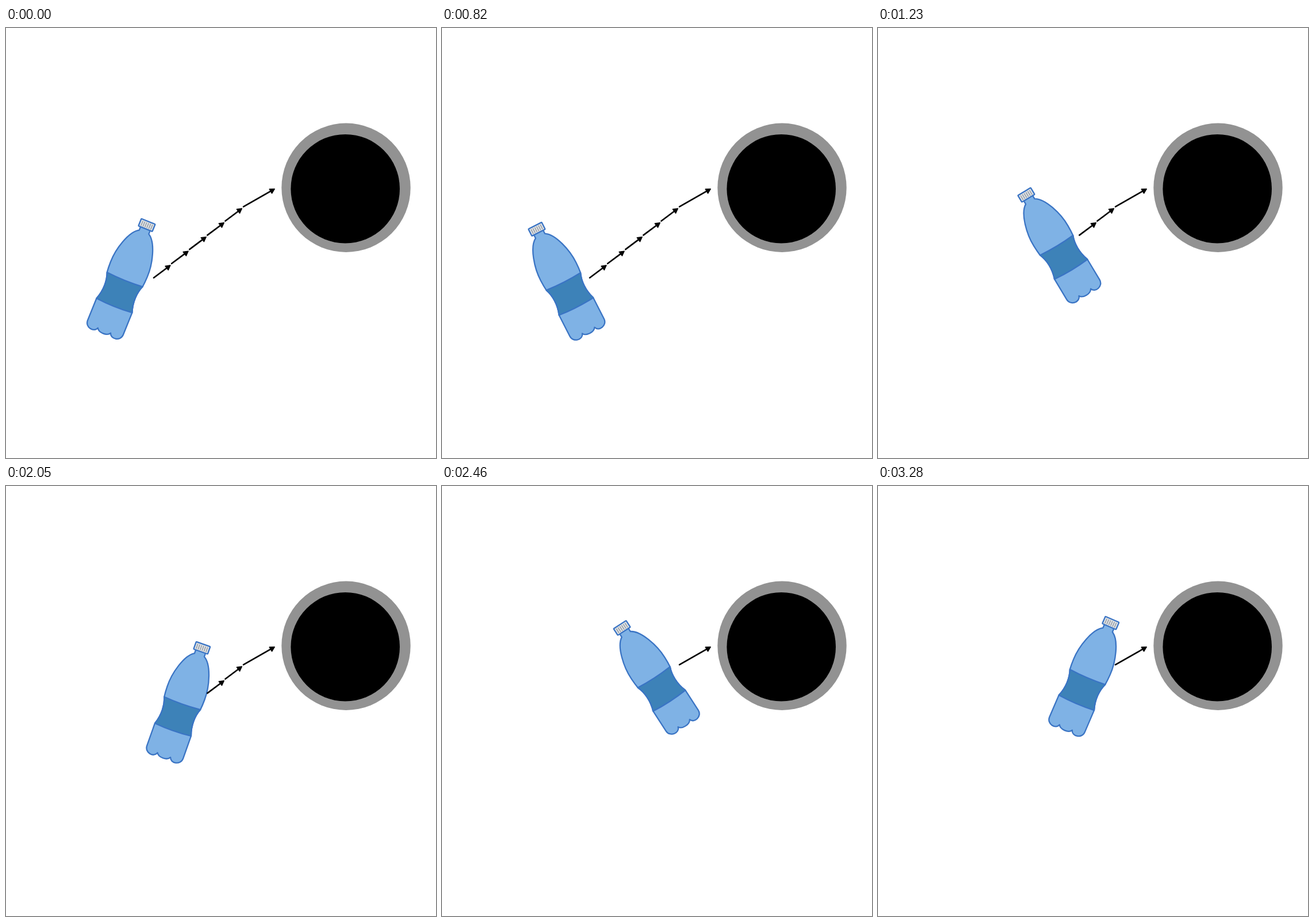
An HTML page for the animation above (3.69 s loop, 748 px wide and 748 px high).

```html
<!DOCTYPE html>
<html lang="en">
<head>
<meta charset="utf-8">
<title>Bottle rocking toward a hole</title>
<style>
  html, body { margin: 0; width: 100%; height: 100%; overflow: hidden; background: #fff; }
  svg { display: block; width: 100%; height: 100%; }
  #bottle { stroke: #3a74c4; stroke-width: 2.3; stroke-linejoin: round; stroke-linecap: round; }
</style>
</head>
<body>
<svg viewBox="0 0 748 748">
  <circle cx="591.5" cy="277.8" r="112.2" fill="#929292"/>
  <circle cx="590.2" cy="279.7" r="94.8"/>
  <g id="bottle">
    <path fill="#7fb2e5" d="M-10-95V-88C-26-79-36-42-35.5-18C-35.4-10-35-4-34.4 1
      C-29 14-28 32-34.4 49.7V91C-34.4 104-16 107-13 96.5C-9 104 7 104 11 96.5
      C14 107 32.4 104 32.4 91V49.7C26 32 27 14 32.4 1C33-4 33.4-10 33.5-18
      C34-42 24-79 8-88V-95Z"/>
    <path fill="#3d82b8" d="M-34.4 1Q-1 4 32.4 1C27 14 26 32 32.4 49.7Q-1 53-34.4 49.7C-28 32-29 14-34.4 1Z"/>
    <rect x="-14" y="-108" width="26" height="13.6" rx="1" fill="#dde1e5"/>
    <path stroke="#8d949c" stroke-width="1.3" d="M-10-105v8m3.6-8v8m3.6-8v8m3.6-8v8m3.6-8v8m3.6-8v8"/>
  </g>
  <g id="arrows" stroke="#000" stroke-linecap="round" stroke-linejoin="round"></g>
</svg>
<script>
  const STEP = 410;
  // Bottle x, y and tilt in degrees: three rocking poses at each of three stops.
  const poses = [
    [208, 437, 22], [209.4, 438.4, 0], [211.7, 439.6, -27],
    [310.9, 376.6, -31], [309.2, 377.6, 0], [308, 377.3, 19.5],
    [369, 331.2, -33], [367.2, 331, 0], [365.8, 331.7, 23.2]
  ];
  const firstArrow = [0, 3, 5]; // arrows already passed at each stop

  const bottle = document.getElementById('bottle');
  const arrows = document.getElementById('arrows');

  function arrow(x1, y1, x2, y2) {
    const length = Math.hypot(x2 - x1, y2 - y1);
    const angle = Math.atan2(y2 - y1, x2 - x1) * 180 / Math.PI;
    return `<g transform="translate(${x1} ${y1}) rotate(${angle})">
      <path stroke-width="2.6" d="M0 0H${length - 5}"/>
      <path stroke-width="1.4" d="M${length} 0l-8-4.4v8.8z"/></g>`;
  }

  let markup = '';
  for (let i = 0; i < 5; i++) {
    const x = 257 + 31.1 * i, y = 434.5 - 24.7 * i;
    markup += arrow(x, y, x + 29, y - 21.7);
  }
  arrows.innerHTML = markup + arrow(413, 310.8, 467.3, 280);

  function draw(now) {
    const step = Math.floor(now / STEP) % poses.length;
    const [x, y, tilt] = poses[step];
    bottle.setAttribute('transform', `translate(${x} ${y}) rotate(${tilt})`);
    const first = firstArrow[Math.floor(step / 3)];
    [...arrows.children].forEach((a, i) => a.style.display = i < first ? 'none' : '');
  }

  const start = performance.now();
  function tick() {
    draw(performance.now() - start);
    requestAnimationFrame(tick);
  }
  tick();
</script>
</body>
</html>
```
